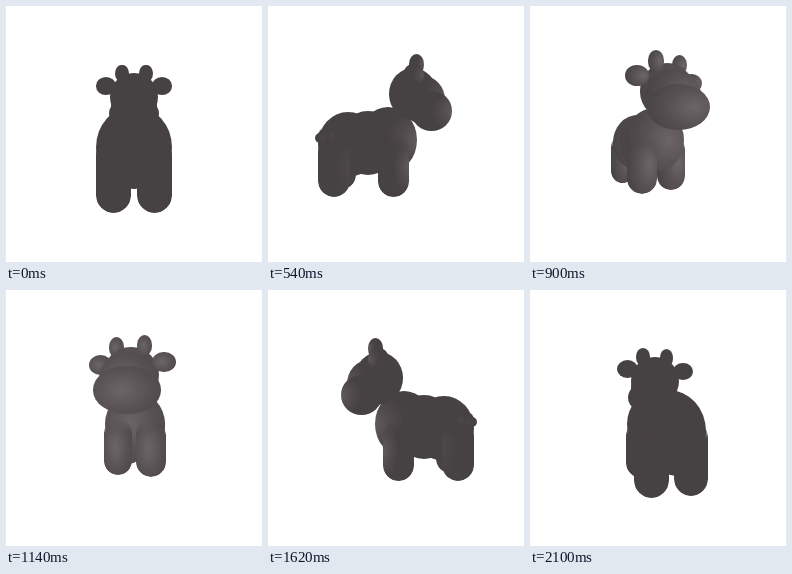
Write an HTML page without scripts that moves like this. It is 256 px wide and 256 px high and loops after 2.16 s.

```html
<!DOCTYPE html>
<html lang="en">
<head>
<meta charset="utf-8">
<title>Turning cow</title>
<style>
@property --a {
  syntax: "<angle>";
  inherits: true;
  initial-value: 0deg;
}
@keyframes spin {
  from { --a: 0deg; }
  to { --a: 360deg; }
}
html, body {
  margin: 0;
  width: 100%;
  height: 100%;
  overflow: hidden;
  background: #fff;
}
.cow {
  --sn: sin(var(--a));
  --cs: cos(var(--a));
  /* light in front of the face: strength, reach and centre */
  --lit: clamp(0, .7 - .75 * var(--cs), 1);
  --reach: calc(50% * (1 - .75 * var(--cs)));
  --cx: calc(50% + 50% * var(--sn) * (1 + .5 * max(0, var(--cs))));
  position: absolute;
  left: 0;
  top: 0;
  width: 256px;
  height: 256px;
  overflow: hidden;
  animation: spin 2160ms steps(36) infinite;
}
/* Each part is an ellipsoid: centre f (forward), l (right), y (up), radii rf, rl, ry */
.cow i {
  --l: 0;
  --x: calc(var(--f) * var(--sn) + var(--l) * var(--cs));
  --z: calc(var(--l) * var(--sn) - var(--f) * var(--cs));
  --s: calc(221.7 / (221.7 - var(--z)));
  --w: calc(var(--s) * hypot(var(--rf) * var(--sn), var(--rl) * var(--cs)));
  --h: calc(var(--s) * var(--ry));
  position: absolute;
  left: calc(1px * (128 + var(--x) * var(--s) - var(--w)));
  top: calc(1px * (128 - var(--y) * var(--s) - var(--h)));
  width: calc(2px * var(--w));
  height: calc(2px * var(--h));
  z-index: calc(200 + var(--z));
  border-radius: 50%;
  background:
    radial-gradient(var(--reach) var(--reach) at var(--cx) 50%,
      rgb(108 101 103 / var(--lit)),
      rgb(94 87 89 / calc(.7 * var(--lit))) 50%,
      rgb(70 65 66 / 0)),
    #464142;
}
/* parts shaded by the ones in front of them */
.cow .rump, .cow .waist, .cow .dock, .cow .tail, .cow .skull, .cow .hind {
  --lit: clamp(0, .2 - .9 * var(--cs), 1);
}
.cow .rump { --f: -48; --y: -10.5; --rf: 30; --ry: 32.5; --rl: 29.5; }
.cow .waist { --f: -28; --y: -9; --rf: 30; --ry: 32; --rl: 28; }
.cow .chest { --f: -8; --y: -6; --rf: 29; --ry: 33; --rl: 31; }
.cow .dock { --f: -70; --y: -2; --rf: 8; --ry: 8; --rl: 6; }
.cow .tail { --f: -76; --y: -4; --rf: 5; --ry: 5; --rl: 4; }
.cow .skull { --f: 17; --y: 40; --rf: 24; --ry: 26; --rl: 26; }
.cow .brow { --f: 27; --y: 34; --rf: 22; --ry: 24; --rl: 26; }
.cow .muzzle { --f: 35; --y: 23.5; --rf: 20.5; --ry: 20; --rl: 29; }
.cow .ear { --f: 15; --y: 51; --rf: 9; --ry: 9.5; --rl: 11; }
.cow .horn { --f: 19; --y: 65.5; --rf: 7.2; --ry: 9.5; --rl: 7.2; }
.cow .leg {
  --y: -30;
  --ry: 28.5;
  border-radius: 99px;
  -webkit-mask-image: linear-gradient(transparent, #000 25%);
  mask-image: linear-gradient(transparent, #000 25%);
}
.cow .fore { --f: -2; --rf: 14.4; --rl: 14.7; }
.cow .hind { --f: -58; --rf: 14.8; --rl: 12.9; }
.cow .ear.r { --l: 30; }
.cow .ear.n { --l: -30; }
.cow .horn.r { --l: 13; }
.cow .horn.n { --l: -13; }
.cow .fore.r { --l: 17; }
.cow .fore.n { --l: -17; }
.cow .hind.r { --l: 15.2; }
.cow .hind.n { --l: -15.2; }
</style>
</head>
<body>
<div class="cow">
  <i class="rump"></i><i class="waist"></i><i class="chest"></i>
  <i class="dock"></i><i class="tail"></i>
  <i class="skull"></i><i class="brow"></i><i class="muzzle"></i>
  <i class="ear r"></i><i class="ear n"></i>
  <i class="horn r"></i><i class="horn n"></i>
  <i class="leg fore r"></i><i class="leg fore n"></i>
  <i class="leg hind r"></i><i class="leg hind n"></i>
</div>
</body>
</html>
```
